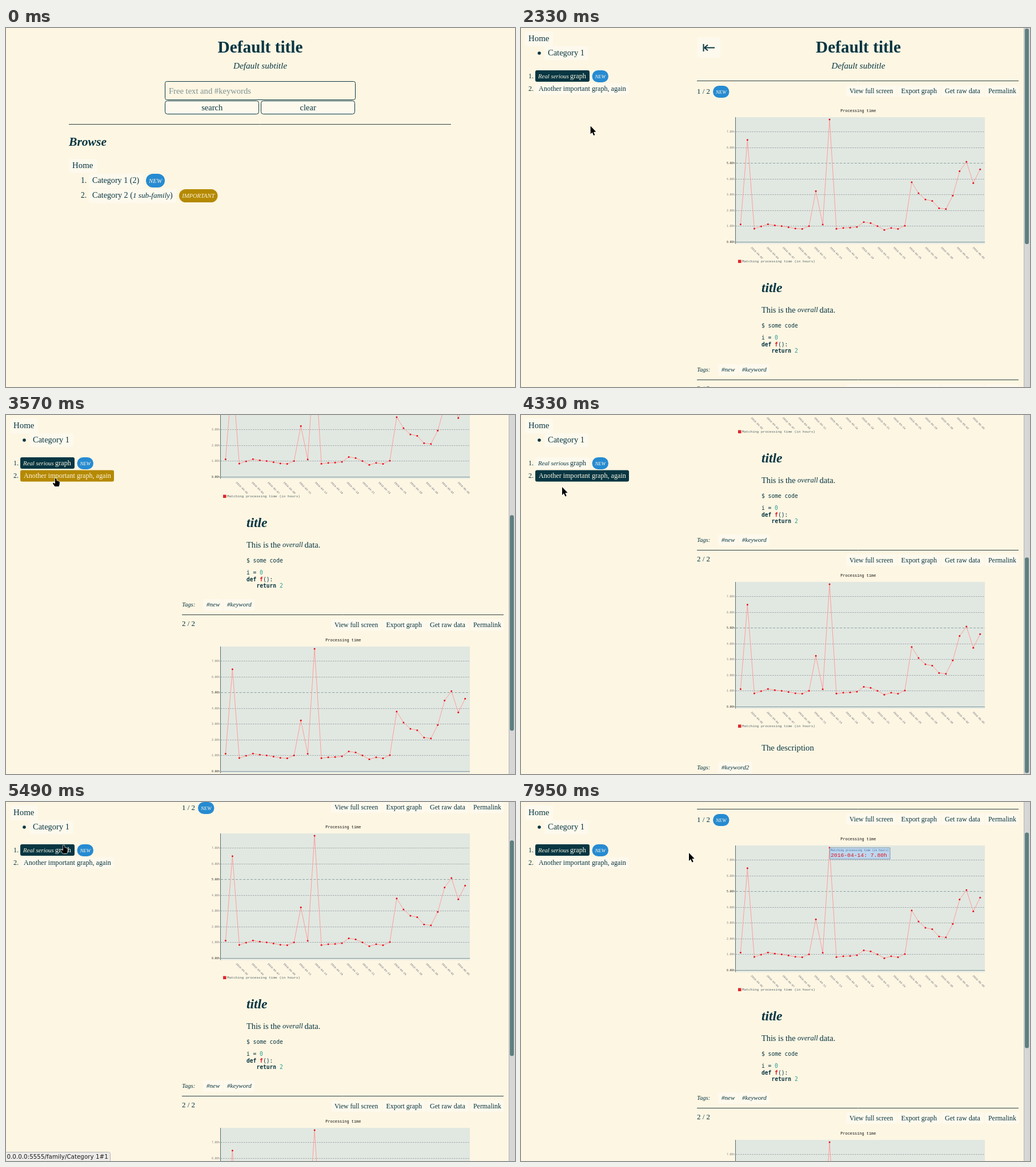
An HTML page with a canvas that plays this animation: 891 by 628 pixels, repeating every 7.99 s.

```html
<!DOCTYPE html>
<html lang="en">
<head>
<meta charset="utf-8">
<title>Graph browser</title>
<style>
html, body { margin: 0; width: 100%; height: 100%; overflow: hidden; background: #fdf6e3; }
canvas { display: block; }
</style>
</head>
<body>
<canvas id="stage" width="891" height="628"></canvas>
<script>
const ctx = document.getElementById('stage').getContext('2d');
const LOOP = 7990, PAGE_SWITCH = 1850, MAX_SCROLL = 379;
const CREAM = '#fdf6e3', DARK = '#073642', PALE = '#fef9ed', RULE = '#30403f';
const BLUE = '#268bd2', GOLD = '#b58900', CYAN = '#2aa198';
const SERIF = '"Liberation Serif", serif', MONO = '"Liberation Mono", monospace';
const CODE = '"DejaVu Sans Mono", monospace', SANS = '"DejaVu Sans", sans-serif';

const HOURS = [1.11, 6.5, .84, .98, 1.12, 1.05, 1, .93, .85, .82, 1, 3.24, 1.1, 7.8, .83, .88, .9, .95,
  1.26, 1.19, 1, .76, .88, .82, 1.02, 3.8, 3.1, 2.7, 2.61, 2.14, 2.09, 2.94, 4.5, 5.1, 3.75, 4.62];

// Pointer keyframes: time, x, y
const POINTER = [[840, 4, 240], [1060, 135, 240], [1300, 173, 270], [1850, 173, 270], [2610, 100, 130],
  [2850, 87, 111], [4070, 87, 111], [4330, 72, 126], [4840, 101, 76], [5740, 101, 76], [5820, 324, 60],
  [6230, 324, 60], [6510, 506, 87], [6990, 541, 82], [7580, 541, 82], [7950, 294, 89]];

const progress = (t, from, to) => Math.min(1, Math.max(0, (t - from) / (to - from)));
const swing = p => .5 - .5 * Math.cos(Math.PI * p);

// y is the visual middle of the letters
function text(str, x, y, size, { style = '', family = SERIF, color = DARK, align = 'left' } = {}) {
  ctx.font = `${style} ${size}px ${family}`;
  ctx.fillStyle = color;
  ctx.textAlign = align;
  ctx.fillText(str, x, y + size * .31);
}

function box(x, y, w, h, fill, radius = 3, stroke) {
  ctx.beginPath();
  ctx.roundRect(x, y, w, h, radius);
  ctx.fillStyle = fill;
  ctx.fill();
  if (stroke) {
    ctx.strokeStyle = stroke;
    ctx.lineWidth = 1;
    ctx.stroke();
  }
}

function line(x1, y1, x2, y2, color, dash = [], width = 1) {
  ctx.setLineDash(dash);
  ctx.strokeStyle = color;
  ctx.lineWidth = width;
  ctx.beginPath();
  ctx.moveTo(x1, y1);
  ctx.lineTo(x2, y2);
  ctx.stroke();
  ctx.setLineDash([]);
}

function polygon(points, fill) {
  ctx.beginPath();
  points.forEach(([x, y]) => ctx.lineTo(x, y));
  ctx.closePath();
  ctx.strokeStyle = 'rgba(255,255,255,.8)';
  ctx.lineWidth = 1.5;
  ctx.stroke();
  ctx.fillStyle = fill;
  ctx.fill();
}

function badge(label, x, y, w, h, size, color = BLUE) {
  box(x, y, w, h, color, h / 2);
  text(label, x + w / 2, y + h / 2 + .5, size, { style: 'italic', color: CREAM, align: 'center' });
}

function heading(x) {
  text('Default title', x, 33.5, 29.3, { style: 'bold', align: 'center' });
  text('Default subtitle', x, 66, 15.2, { style: 'italic', align: 'center' });
}

const inside = (p, x, y, w, h) => p && p.x >= x && p.x < x + w && p.y >= y && p.y < y + h;

function pointerAt(t) {
  if (t < POINTER[0][0]) return null;
  const next = POINTER.findIndex(k => k[0] > t);
  if (next < 0) {
    const [, x, y] = POINTER.at(-1);
    return { x, y };
  }
  const [t0, x0, y0] = POINTER[next - 1], [t1, x1, y1] = POINTER[next];
  const p = swing(progress(t, t0, t1));
  return { x: x0 + (x1 - x0) * p, y: y0 + (y1 - y0) * p };
}

function scrollAt(t) {
  const down = MAX_SCROLL * swing(progress(t, 3090, 3850));
  const up = (MAX_SCROLL - 80) * swing(progress(t, 4840, 5625));
  return Math.round(down - up);
}

// Both pages return the address under the pointer, '' for a link without one, null for no link
function drawHome(pointer) {
  heading(445);
  box(278.5, 93.5, 333, 32, CREAM, 3, DARK);
  text('Free text and #keywords', 285, 110, 14.6, { color: '#7d9290' });
  [['search', 278.5], ['clear', 446.5]].forEach(([label, x]) => {
    box(x, 127.5, 164, 23, PALE, 4, DARK);
    text(label, x + 82.2, 139.5, 14.5, { align: 'center' });
  });
  line(110, 168.5, 779, 168.5, RULE);
  text('Browse', 110, 199.5, 21.6, { style: 'italic bold' });

  const onHome = inside(pointer, 110, 229, 50, 24), onFirst = inside(pointer, 145, 255, 95, 25);
  box(110, 229, 50, 24, onHome ? GOLD : PALE);
  text('Home', 116, 240.5, 14.9, { color: onHome ? CREAM : DARK });
  box(145, 255, 95, 25, onFirst ? GOLD : PALE);
  box(145, 281, 153, 25, PALE);
  text('1.', 131, 266.5, 13.6);
  text('2.', 131, 293, 13.6);
  text('Category 1 (2)', 151, 267, 14.1, { color: onFirst ? CREAM : DARK });
  text('Category 2 (', 151, 293, 14.2);
  text('1 sub-family', 222, 293, 13.1, { style: 'italic' });
  text(')', 287, 293, 14.2);
  badge('NEW', 245, 255, 33, 24, 10.9);
  badge('IMPORTANT', 303, 282, 67.5, 23, 10.5, GOLD);
  return onFirst ? '0.0.0.0:5555/family/Category 1' : onHome ? '' : null;
}

function drawChart(top) {
  const valueY = v => top + 218 - v * 27.43, pointX = i => 384.4 + i * 11.98;
  text('Processing time', 590.3, top - 11, 6.9, { family: MONO, color: '#111', align: 'center' });
  ctx.fillStyle = '#e1e8e1';
  ctx.fillRect(376, top, 436, 221.5);
  for (let v = 0; v <= 7; v++) {
    const y = Math.floor(valueY(v)) + .5, major = v % 5 === 0;
    if (v) line(376, y, 812, y, major ? '#8fa2a3' : '#a3a9b0', major ? [4, 2.5] : [2.5, 1.5]);
    else line(376, y, 812, y, '#7f989c');
    text(v + '.00h', 374, y, 4.7, { family: MONO, color: major ? '#222' : '#777', align: 'right' });
  }
  line(375.5, top, 375.5, top + 221.5, '#4f6f73');

  ctx.beginPath();
  HOURS.forEach((h, i) => ctx.lineTo(pointX(i), valueY(h)));
  ctx.strokeStyle = '#ff9c9c';
  ctx.lineWidth = 1;
  ctx.stroke();
  ctx.fillStyle = '#e5121b';
  HOURS.forEach((h, i) => {
    ctx.beginPath();
    ctx.arc(pointX(i), valueY(h), 1.5, 0, 7);
    ctx.fill();
  });

  for (let k = 0; k < 15; k++) {
    const day = 2 + Math.round(k * 7 / 3);
    const date = new Date(Date.UTC(2016, 3, day)).toISOString().slice(0, 10);
    ctx.save();
    ctx.translate(403 + k * 27.73, top + 227.5);
    ctx.rotate(Math.PI / 4);
    text(date, 0, 0, 4.7, { family: MONO, color: '#667' });
    ctx.restore();
  }
  box(380, top + 249.5, 5.5, 5.5, '#e0262c', 0);
  text('Matching processing time (in hours)', 387, top + 252, 6.1, { family: MONO, color: '#53666a' });
}

function drawSectionBar(label, labelY, ruleY) {
  line(308, ruleY + .5, 871, ruleY + .5, RULE);
  text(label, 308, labelY, 12.9);
  [['View full screen', 569, 89, 11.65], ['Export graph', 659.5, 75, 11.9], ['Get raw data', 736, 74, 12.1], ['Permalink', 812, 59, 11.9]]
    .forEach(([name, x, w, size]) => {
      box(x, ruleY + 8, w, 20, PALE);
      text(name, x + 6, ruleY + 18, size);
    });
}

function drawTags(y, tags) {
  text('Tags:', 308, y, 10.6, { style: 'italic' });
  tags.forEach(([name, x, w]) => {
    box(x, y - 10, w, 20, PALE);
    text(name, x + 6, y, 11.1, { style: 'italic' });
  });
}

function drawCode() {
  const code = (str, x, y, style = '', color = DARK) => text(str, x, y, 9.65, { family: CODE, style, color });
  code('$ some code', 421, 521);
  code('i = ', 421, 542.5);
  code('0', 444, 542.5, '', CYAN);
  code('def', 421, 553.8, 'bold');
  code('f', 444, 553.8, 'bold', '#dc1c22');
  code('():', 450, 553.8);
  code('return', 438.4, 565.3, 'bold');
  code('2', 479, 565.3, '', CYAN);
}

function drawTooltip(alpha) {
  if (!alpha) return;
  ctx.globalAlpha = alpha;
  box(540.5, 160, 105.5, 20, '#bcd7ee', 0, '#8298a8');
  text('Matching processing time (in hours)', 542, 164.7, 4.85, { family: MONO, color: '#4a6c9b' });
  text('2016-04-14: 7.80h', 542, 173, 9.7, { family: MONO, color: '#e5121b' });
  ctx.globalAlpha = 1;
}

function drawContent(t, scroll) {
  ctx.save();
  ctx.translate(0, -scroll);
  heading(590.5);
  box(308, 16, 41, 36, PALE);
  line(319.5, 28, 319.5, 41, DARK, [], 2);
  line(321, 34.5, 339, 34.5, DARK, [], 2);
  line(321, 34.5, 327, 29.5, DARK, [], 2);
  line(321, 34.5, 327, 39.5, DARK, [], 2);

  drawSectionBar('1 / 2', 111, 92);
  badge('NEW', 336, 101, 28.5, 21, 8.8);
  drawChart(156);
  text('title', 421, 454.5, 23.5, { style: 'italic bold' });
  text('This is the', 421, 493.5, 14.3);
  text('overall', 484, 493.5, 12.6, { style: 'italic' });
  text('data.', 522.5, 493.5, 14.6);
  drawCode();
  drawTags(598, [['#new', 345, 35], ['#keyword', 381, 54]]);

  drawSectionBar('2 / 2', 631, 615);
  drawChart(671);
  text('The description', 421, 961, 14.7);
  drawTags(996, [['#keyword2', 345, 60]]);
  drawTooltip(progress(t, 7000, 7200));
  ctx.restore();
}

function drawSidebar(pointer, scroll) {
  box(7, 6, 49, 26, PALE);
  text('Home', 13, 18, 14.9);
  box(41, 32, 77, 24, PALE);
  text('Category 1', 47, 44, 14.5);
  ctx.beginPath();
  ctx.arc(32, 44, 2.8, 0, 7);
  ctx.fill();

  const active = scroll > 301 ? 1 : 0;
  const rows = [[74, 95], [96.5, 164]];
  const hovered = rows.findIndex(([y, w]) => inside(pointer, 25, y, w, 20));
  const colors = rows.map(([y, w], i) => {
    const fill = i === active ? DARK : i === hovered ? GOLD : PALE;
    box(25, y, w, 20, fill);
    text(i + 1 + '.', 13, y + 10, 12);
    return fill === PALE ? DARK : CREAM;
  });
  text('Real serious', 30, 84.5, 10.8, { style: 'italic', color: colors[0] });
  text('graph', 86, 84.5, 12.3, { color: colors[0] });
  text('Another important graph, again', 31, 106, 12.13, { color: colors[1] });
  badge('NEW', 124.5, 74, 28.5, 21, 8.8);
  return hovered < 0 ? null : `0.0.0.0:5555/family/Category 1#${hovered + 1}`;
}

function drawScrollbar(scroll) {
  ctx.fillStyle = '#d6d6d6';
  ctx.fillRect(880, 0, 11, 628);
  line(880.5, 0, 880.5, 628, '#b4b4b4');
  box(882, 1 + scroll * .655, 7, 377, '#5d7f7f', 3);
}

function drawStatus(address) {
  ctx.font = `10.35px ${SANS}`;
  const width = ctx.measureText(address).width + 6;
  box(-3, 612.5, Math.round(width) + 2.5, 18, '#ecebe8', 3, '#b3b3b3');
  text(address, 1.5, 620.8, 10.35, { family: SANS, color: '#1a1a1a' });
}

function drawPointer({ x, y }, hand) {
  ctx.save();
  ctx.translate(x, y);
  polygon(hand
    ? [[-1, 0], [1, 0], [1.8, 4], [6, 5], [7, 7], [6.5, 11], [5.5, 14], [-1.5, 14], [-5, 9], [-4.5, 7.5], [-1, 9]]
    : [[0, 0], [0, 14], [3, 11], [5.5, 16.5], [7.7, 15.5], [5.3, 10.3], [9.6, 10]], '#000');
  ctx.restore();
}

function draw(t) {
  ctx.fillStyle = CREAM;
  ctx.fillRect(0, 0, 891, 628);
  const pointer = pointerAt(t);
  let address;
  if (t < PAGE_SWITCH) {
    address = drawHome(pointer);
  } else {
    const scroll = scrollAt(t);
    drawContent(t, scroll);
    address = drawSidebar(pointer, scroll);
    drawScrollbar(scroll);
  }
  const statusHidden = t > 2970 && t < 4330;
  if (address && !statusHidden) drawStatus(address);
  if (pointer) drawPointer(pointer, address !== null);
}

const start = performance.now();
function tick() {
  draw((performance.now() - start) % LOOP);
  requestAnimationFrame(tick);
}
tick();
</script>
</body>
</html>
```
